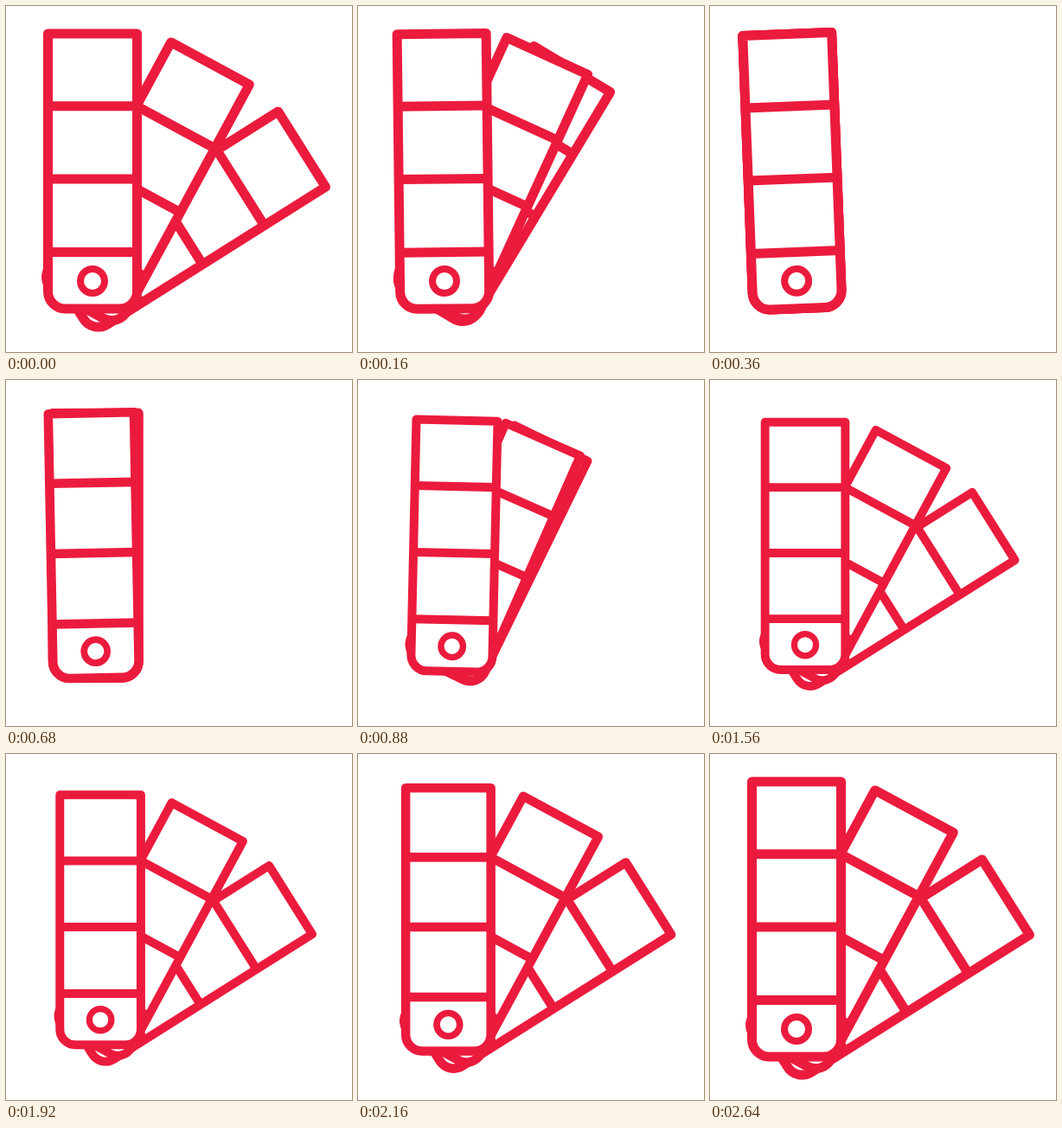
An HTML page for the animation above (2.88 s loop, 400 by 400 pixels).

```html
<!DOCTYPE html>
<html lang="en">
<head>
<meta charset="utf-8">
<title>Colour swatch fan</title>
<style>
html, body { margin: 0; width: 100%; height: 100%; overflow: hidden; background: #fff; }
svg { display: block; width: 100%; height: 100%; }
</style>
</head>
<body>
<svg viewBox="0 0 400 400">
  <defs>
    <!-- One swatch card, pivot hole at 0,0 -->
    <g id="card">
      <path d="M-51.5-286H51.5V12A20 20 0 0 1 31.5 32H-31.5A20 20 0 0 1-51.5 12Z"/>
      <path d="M-51.5-202.3H51.5M-51.5-118H51.5M-51.5-33.4H51.5"/>
      <circle r="14" stroke-width="8"/>
    </g>
  </defs>
  <g id="fan" fill="#fff" stroke="#eb1b3d" stroke-width="11" stroke-linejoin="round">
    <use id="back" href="#card"/>
    <use id="middle" href="#card"/>
    <use href="#card"/>
  </g>
</svg>
<script>
const LOOP = 2880, STEP = 40;
const MIDDLE = 28.4, EXTRA = 29.4;
const byId = id => document.getElementById(id);
const fan = byId('fan'), middle = byId('middle'), back = byId('back');

const part = (t, a, b) => Math.min(1, Math.max(0, (t - a) / (b - a)));
const smooth = x => x * x * (3 - 2 * x);
const ease = (t, a, b) => smooth(part(t, a, b));

// cubic-bezier(.7, 0, .3, 1)
function sharp(x) {
  let lo = 0, hi = 1;
  for (let i = 0; i < 24; i++) {
    const u = (lo + hi) / 2, v = 1 - u;
    if (2.1 * u * v * v + 0.9 * u * u * v + u * u * u < x) lo = u; else hi = u;
  }
  return smooth((lo + hi) / 2);
}

function draw(t) {
  const scale = 1 - 0.1 * (sharp(part(t, 240, 1200)) - sharp(part(t, 1620, 2660)));
  const sway = -2.6 * ease(t, 0, 480) + 4.4 * ease(t, 480, 990) - 1.8 * ease(t, 990, 1560);
  const mid = MIDDLE * (1 - ease(t, 110, 350) + ease(t, 640, 980));
  const extra = EXTRA * (1 - ease(t, 0, 230) + ease(t, 835, 1100));

  fan.setAttribute('transform',
    `translate(200 200) scale(${scale}) translate(-100 118) rotate(${sway})`);
  middle.setAttribute('transform', `rotate(${mid})`);
  back.setAttribute('transform', `rotate(${mid + extra})`);
}

const start = performance.now();
function tick() {
  const t = (performance.now() - start) % LOOP;
  draw(Math.floor(t / STEP) * STEP);
  requestAnimationFrame(tick);
}
tick();
</script>
</body>
</html>
```
